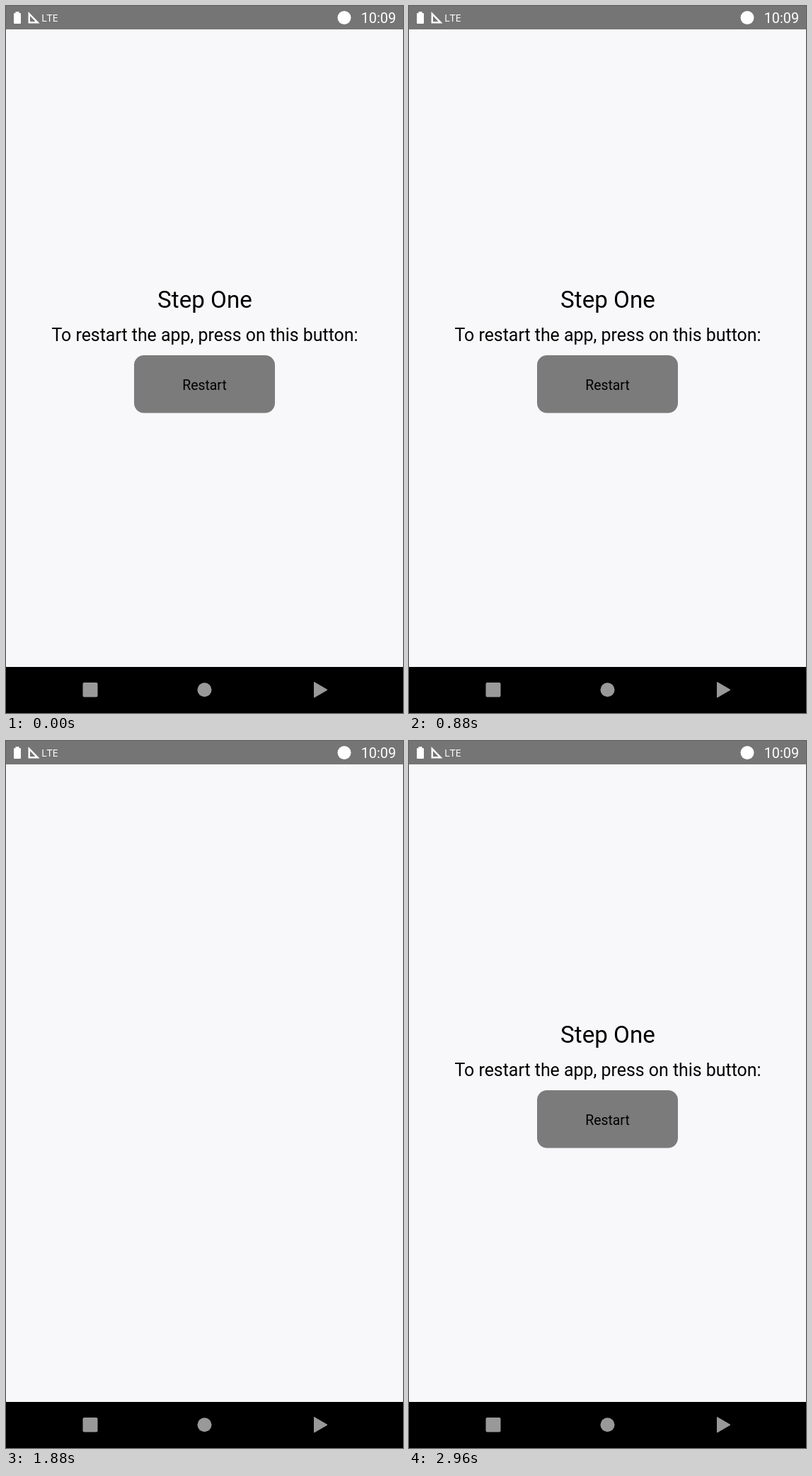
Animation of 561x998 px, one loop 3 s. Source, as an HTML page:

```html
<!DOCTYPE html>
<html lang="en">
<head>
<meta charset="utf-8">
<title>Step One</title>
<style>
  html, body { margin: 0; width: 100%; height: 100%; overflow: hidden; background: #f8f8fa; }
  svg { display: block; width: 100%; height: 100%; }
  text { font-family: Roboto, sans-serif; }
  .mid { text-anchor: middle; }
</style>
</head>
<body>
<svg viewBox="0 0 561 998">
  <rect width="561" height="998" fill="#f8f8fa"/>

  <rect width="561" height="33" fill="#757575"/>
  <g fill="#fff">
    <path d="M13.5 8h5v2h1.5q1 0 1 1v13q0 1-1 1h-8q-1 0-1-1v-13q0-1 1-1h1.5z"/>
    <path fill-rule="evenodd" d="M31.5 8L47.5 24.5H31.5zM34 14V22H41.5z"/>
    <text x="50" y="22" font-size="14.8" style="font-family: 'Open Sans', sans-serif">LTE</text>
    <circle cx="478" cy="16.5" r="9.5"/>
    <text x="551" y="24" font-size="19.8" text-anchor="end">10:09</text>
  </g>

  <g id="content">
    <text class="mid" x="281" y="426" font-size="33.2">Step One</text>
    <text class="mid" x="281" y="472.5" font-size="24.9">To restart the app, press on this button:</text>
    <rect x="181" y="493" width="199" height="81.5" rx="14" fill="#7b7b7b"/>
    <text class="mid" x="280.5" y="542" font-size="19.4">Restart</text>
  </g>

  <rect y="933" width="561" height="65"/>
  <g fill="#999">
    <rect x="108.5" y="955" width="21" height="20.5" rx="2"/>
    <circle cx="280.5" cy="965.3" r="10"/>
    <path d="M435.5 954.5L454 965.3L435.5 976z" stroke="#999" stroke-linejoin="round"/>
  </g>
</svg>
<script>
  const LOOP = 3000, HIDE = 1880, FADE_START = 2050, FADE = 500;
  const content = document.getElementById('content');

  // cubic-bezier(.42, 0, 1, 1), solved for x by bisection
  function easeIn(x) {
    let lo = 0, hi = 1;
    for (let i = 0; i < 24; i++) {
      const s = (lo + hi) / 2, r = 1 - s;
      if (1.26 * r * r * s + 3 * r * s * s + s * s * s < x) lo = s;
      else hi = s;
    }
    return lo * lo * (3 - 2 * lo);
  }

  const easeInOut = u => u < 0.5 ? easeIn(2 * u) / 2 : 1 - easeIn(2 - 2 * u) / 2;

  function opacityAt(t) {
    if (t < HIDE) return 1;
    const u = (t - FADE_START) / FADE;
    return u <= 0 ? 0 : u >= 1 ? 1 : easeInOut(u);
  }

  const start = performance.now();
  function draw() {
    const t = (performance.now() - start) % LOOP;
    content.setAttribute('opacity', opacityAt(t));
    requestAnimationFrame(draw);
  }
  draw();
</script>
</body>
</html>
```
